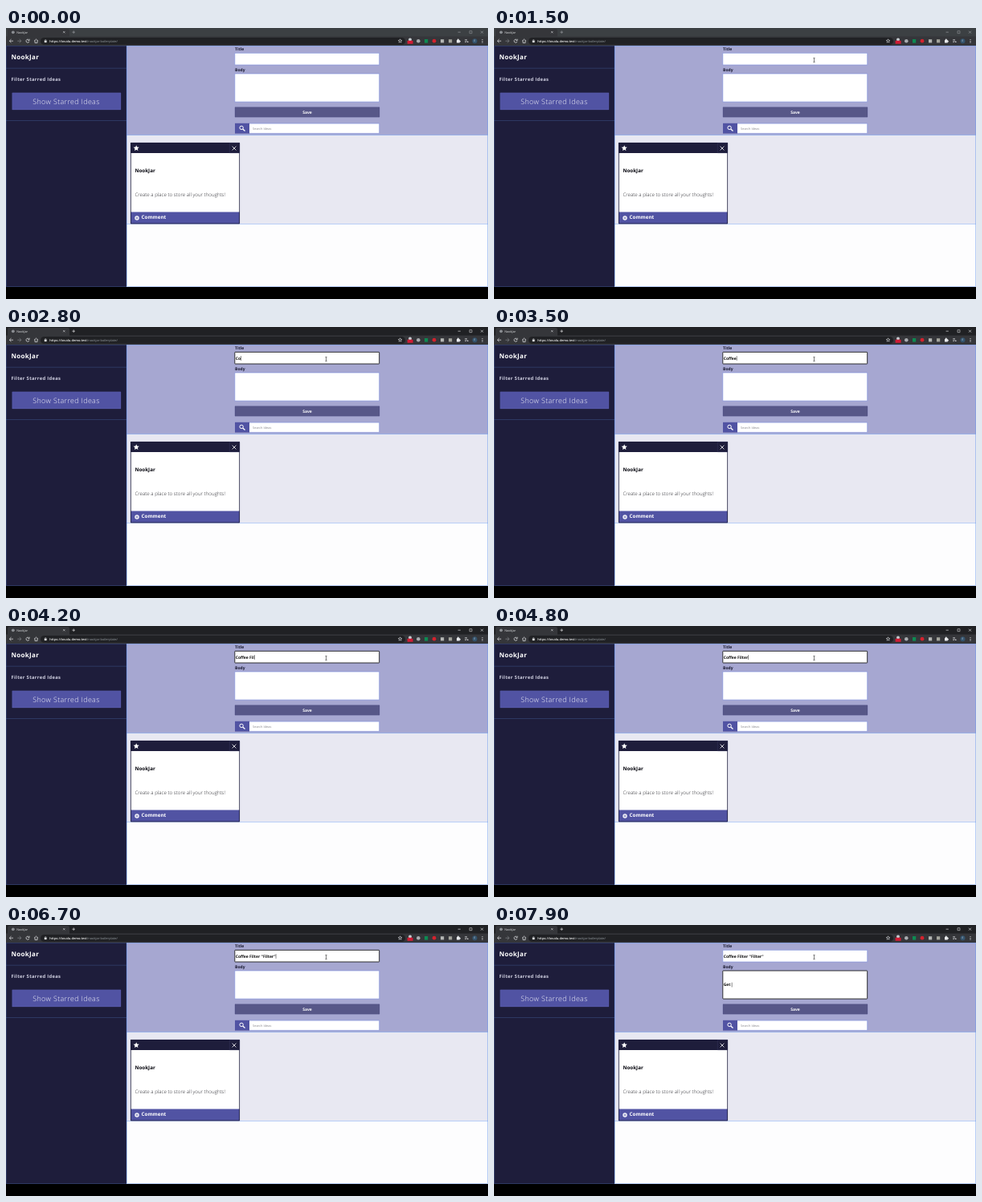
Animation of 600 by 338 pixels, one loop 8000 ms. Source, as an HTML page with a canvas:

```html
<!DOCTYPE html>
<html lang="en">
<head>
<meta charset="utf-8">
<title>Notes form</title>
<style>
  html, body { margin: 0; width: 100%; height: 100%; overflow: hidden; background: #000; }
  canvas { display: block; width: 600px; height: 338px; }
</style>
</head>
<body>
<canvas id="stage"></canvas>
<script>
const W = 600, H = 338, LOOP = 8000;
const canvas = document.getElementById('stage');
const ctx = canvas.getContext('2d');
const dpr = window.devicePixelRatio || 1;
canvas.width = W * dpr;
canvas.height = H * dpr;

const APP = 'NookJar';
const DARK = '#1e1d3b', INDIGO = '#5153a3', LILAC = '#a6a7d1', PALE = '#e8e8f2';
const GRID = 'rgba(100,149,237,0.5)', GRID_DIM = 'rgba(100,149,237,0.28)';

// Time of each keystroke
const TITLE = 'Coffee Filter "Filter"';
const TITLE_KEYS = [2500, 2800, 3000, 3100, 3300, 3500, 3800, 3900, 4000, 4200, 4400,
  4600, 4800, 5000, 5100, 5300, 5400, 5500, 5600, 5800, 6000, 6300];
const BODY = 'Get ';
const BODY_KEYS = [7500, 7600, 7700, 7800];
const FOCUS_TITLE = 1600, FOCUS_BODY = 6800;
const MOVE_START = 1000, MOVE_END = 1500;

function rect(x, y, w, h, fill) {
  ctx.fillStyle = fill;
  ctx.fillRect(x, y, w, h);
}

function round(x, y, w, h, r, fill) {
  ctx.beginPath();
  ctx.roundRect(x, y, w, h, r);
  ctx.fillStyle = fill;
  ctx.fill();
}

function frame(x, y, w, h, color, width = 0.6, r = 0) {
  ctx.beginPath();
  ctx.roundRect(x, y, w, h, r);
  ctx.strokeStyle = color;
  ctx.lineWidth = width;
  ctx.stroke();
}

function dot(x, y, r, fill) {
  ctx.beginPath();
  ctx.arc(x, y, r, 0, Math.PI * 2);
  ctx.fillStyle = fill;
  ctx.fill();
}

function ring(x, y, r, color, width, from = 0, to = Math.PI * 2) {
  ctx.beginPath();
  ctx.arc(x, y, r, from, to);
  ctx.strokeStyle = color;
  ctx.lineWidth = width;
  ctx.stroke();
}

function line(color, width, ...pts) {
  ctx.beginPath();
  for (let i = 0; i < pts.length; i += 2) ctx.lineTo(pts[i], pts[i + 1]);
  ctx.strokeStyle = color;
  ctx.lineWidth = width;
  ctx.stroke();
}

function cross(x, y, r, color, width) {
  line(color, width, x - r, y - r, x + r, y + r);
  line(color, width, x + r, y - r, x - r, y + r);
}

function starPath(x, y, r) {
  ctx.beginPath();
  for (let i = 0; i < 10; i++) {
    const a = -Math.PI / 2 + i * Math.PI / 5;
    const d = i % 2 ? r * 0.46 : r;
    ctx.lineTo(x + Math.cos(a) * d, y + Math.sin(a) * d);
  }
  ctx.closePath();
}

// Draws at four times the size and scales down for even glyph spacing; returns the width.
function text(str, x, y, size, color, { weight = 400, align = 'left', gap = 0 } = {}) {
  ctx.save();
  ctx.translate(x, y);
  ctx.scale(0.25, 0.25);
  ctx.font = `${weight} ${size * 4}px "Open Sans", sans-serif`;
  ctx.letterSpacing = gap * 4 + 'px';
  ctx.textRendering = 'geometricPrecision';
  ctx.textAlign = align;
  ctx.fillStyle = color;
  ctx.fillText(str, 0, 0);
  const width = ctx.measureText(str).width / 4;
  ctx.restore();
  return width;
}

const typed = (str, keys, t) => str.slice(0, keys.filter(k => k <= t).length);

function drawTabs(active) {
  rect(0, 0, W, 11, active ? '#202124' : '#3c4043');
  round(2, 1, 77, 12, 2, '#35363a');
  dot(8.8, 5.3, 1.9, '#8b8e93');
  text(APP, 13.2, 6.7, 3.75, '#e8eaed', { weight: 500 });
  cross(72.3, 5.2, 1.1, '#e0e2e5', 0.6);
  const ink = active ? '#f4f5f6' : '#a2a5a9';
  line(ink, 0.6, 82.4, 5.2, 86, 5.2);
  line(ink, 0.6, 84.2, 3.4, 84.2, 7);
  line(ink, 0.6, 562.6, 5.2, 565.8, 5.2);
  frame(577, 3.7, 3, 3, ink, 0.5);
  cross(592.5, 5.2, 1.5, ink, 0.6);
}

function drawToolbar() {
  const ink = '#e8eaed';
  rect(0, 10.5, W, 11.5, '#35363a');
  round(43, 12, 454, 8.8, 4.4, '#202124');

  line(ink, 0.7, 9, 16.2, 4.4, 16.2);
  line(ink, 0.7, 6.5, 14, 4.3, 16.2, 6.5, 18.4);
  line('#84878b', 0.7, 14.3, 16.2, 18.8, 16.2);
  line('#84878b', 0.7, 16.7, 14, 18.9, 16.2, 16.7, 18.4);
  ring(27, 16.2, 2, ink, 0.7, 0.3, 5.4);
  line(ink, 0.7, 29.1, 13.7, 29.1, 15.5, 27.3, 15.5);
  line(ink, 0.7, 36, 15.6, 36, 18.6, 39, 18.6, 39, 15.6);
  line(ink, 0.7, 35, 16.3, 37.5, 14, 40, 16.3);

  rect(47.8, 15.6, 2.8, 2.5, ink);
  ring(49.2, 15.5, 0.9, ink, 0.5, Math.PI, Math.PI * 2);
  const host = 'https://tovalu.demo.test';
  const w = text(host, 54.3, 17.7, 3.95, '#f4f5f6', { weight: 600 });
  text('/nookjar-boilerplate/', 54.3 + w, 17.7, 3.95, '#9aa0a6');

  starPath(490.6, 16.2, 2.4);
  ctx.strokeStyle = ink;
  ctx.lineWidth = 0.6;
  ctx.stroke();

  dot(503, 14.6, 2, '#c9ccd0');
  round(499.6, 15.8, 7, 4, 0.6, '#d01c35');
  dot(513.3, 16.2, 2.3, '#a9acb0');
  rect(521, 14, 4.2, 4.6, '#0d8a52');
  dot(533, 16.2, 2.4, '#d3222d');
  rect(541, 14.2, 4.2, 4.2, '#b4b6b4');
  rect(551, 14.2, 4.2, 4.2, '#a3a49c');

  round(561, 14.8, 3.8, 3.8, 0.5, ink);
  dot(562.8, 14.5, 0.9, ink);
  dot(565, 16.7, 0.9, ink);
  for (let i = 0; i < 3; i++) {
    line(ink, 0.6, 571.2, 14.6 + i * 1.5, 574 - (i === 2) * 0.8, 14.6 + i * 1.5);
    dot(593, 14.5 + i * 1.7, 0.55, ink);
  }
  dot(574.8, 17.3, 0.8, ink);
  dot(583.5, 16.2, 3, '#34546e');
  text('E', 583.5, 17.4, 3.2, '#dce4ea', { align: 'center' });
}

function drawSidebar() {
  rect(0, 22, 150, 301, DARK);
  frame(0.5, 22.5, 149.5, 300, GRID_DIM, 0.8);
  line(GRID_DIM, 0.8, 0, 50.2, 150, 50.2);
  line(GRID_DIM, 0.8, 0, 115.5, 150, 115.5);
  text(APP, 6.5, 39.4, 8, '#fff', { weight: 700, gap: 0.3 });
  text('Filter Starred Ideas', 6.5, 66.4, 5.85, '#cfcfe0', { weight: 700, gap: 0.31 });
  rect(7.7, 80.8, 135.3, 21.2, INDIGO);
  frame(7.9, 81, 134.9, 20.8, '#5f62b2', 0.4);
  text('Show Starred Ideas', 75, 94.9, 8.9, '#f4f4fb', { weight: 300, align: 'center', gap: 0.36 });
}

function drawField(x, y, w, h, focused) {
  rect(x, y, w, h, '#fff');
  if (focused) frame(x, y, w, h, '#101010', 0.85, 0.6);
  else frame(x, y, w, h, '#7c8fdc', 0.6);
}

function drawEntry(str, baseline, focused) {
  const w = text(str, 285.7, baseline, 5, '#111', { weight: 700 });
  if (focused) rect(285.8 + w, baseline - 4.6, 0.5, 5.8, '#111');
}

function drawForm(t) {
  rect(150, 22, 450, 111.5, LILAC);
  const onTitle = t >= FOCUS_TITLE && t < FOCUS_BODY;
  const onBody = t >= FOCUS_BODY;
  const bold = { weight: 700 };

  text('Title', 285.1, 28, 5, '#17172d', bold);
  drawField(284.8, 31.3, 179.9, 14.7, onTitle);
  drawEntry(typed(TITLE, TITLE_KEYS, t), 40.7, onTitle);

  text('Body', 285.1, 53.6, 5, '#17172d', bold);
  drawField(284.8, 57, 179.9, 35.1, onBody);
  drawEntry(typed(BODY, BODY_KEYS, t), 76.3, onBody);

  rect(285, 98.7, 180, 12.5, '#575788');
  frame(285.1, 98.9, 179.8, 12.1, '#4c4c83', 0.4);
  text('Save', 375, 106.8, 5, '#fff', { weight: 700, align: 'center' });

  drawField(302.5, 119.1, 162.2, 12.3, false);
  rect(285, 118.8, 18, 12.8, INDIGO);
  ring(293.1, 124.4, 2.2, '#fff', 1);
  line('#fff', 1.3, 294.7, 126, 297.5, 128.6);
  text('Search Ideas', 307, 126.7, 3.95, '#85858b');
}

function drawCard() {
  rect(155, 143, 136, 101.2, '#fff');
  rect(155, 143, 136, 13, DARK);
  rect(155, 229.5, 136, 14.7, INDIGO);
  frame(155.4, 143.4, 135.2, 100.5, DARK, 0.8);
  frame(278.3, 143.5, 12.3, 12.2, '#34345c', 0.5);

  starPath(162.2, 150, 3.8);
  ctx.fillStyle = '#fff';
  ctx.fill();
  cross(284, 150, 2.4, '#fff', 0.8);

  text(APP, 160.4, 180, 6.25, '#0c0c14', { weight: 700 });
  text('Create a place to store all your thoughts!', 160.4, 210.3, 6.2, '#1c1c22', { weight: 300 });

  dot(163, 237, 2.7, '#fff');
  line(INDIGO, 0.7, 161.4, 237, 164.6, 237);
  line(INDIGO, 0.7, 163, 235.4, 163, 238.6);
  text('Comment', 168.6, 238.2, 6.25, '#fff', { weight: 700 });
}

function drawPage(t) {
  rect(150, 133, 450, 111.5, PALE);
  rect(150, 244, 450, 79, '#fdfdfe');
  drawForm(t);
  drawSidebar();
  frame(150.5, 22.5, 449, 300, GRID, 0.9);
  line(GRID, 0.9, 150, 133.5, W, 133.5);
  line(GRID, 0.9, 150, 244.5, W, 244.5);
  drawCard();
  rect(0, 323, W, 15, '#000');
}

function drawPointer(t) {
  if (t < MOVE_START) return;
  const p = Math.min(1, (t - MOVE_START) / (MOVE_END - MOVE_START));
  const left = (1 - p) ** 3;
  const x = 398.5 + 200 * left, y = 40 + 62 * left;
  const overTitle = x > 285 && x < 465 && y > 31 && y < 46.3;
  if (overTitle) {
    line('#222', 0.6, x, y - 2.5, x, y + 2.5);
    line('#222', 0.5, x - 1.2, y - 2.6, x + 1.2, y - 2.6);
    line('#222', 0.5, x - 1.2, y + 2.6, x + 1.2, y + 2.6);
    return;
  }
  ctx.save();
  ctx.translate(x, y);
  ctx.beginPath();
  ctx.moveTo(0, 0);
  ctx.lineTo(0, 5.2);
  ctx.lineTo(1.2, 4.1);
  ctx.lineTo(2, 5.9);
  ctx.lineTo(2.8, 5.5);
  ctx.lineTo(2, 3.8);
  ctx.lineTo(3.7, 3.7);
  ctx.closePath();
  ctx.fillStyle = '#fff';
  ctx.fill();
  ctx.strokeStyle = '#111';
  ctx.lineWidth = 0.4;
  ctx.stroke();
  ctx.restore();
}

const start = performance.now();

function render() {
  const t = (performance.now() - start) % LOOP;
  ctx.setTransform(dpr, 0, 0, dpr, 0, 0);
  rect(0, 0, W, H, '#000');
  drawTabs(t >= FOCUS_TITLE);
  drawToolbar();
  drawPage(t);
  drawPointer(t);
  requestAnimationFrame(render);
}

render();
</script>
</body>
</html>
```
